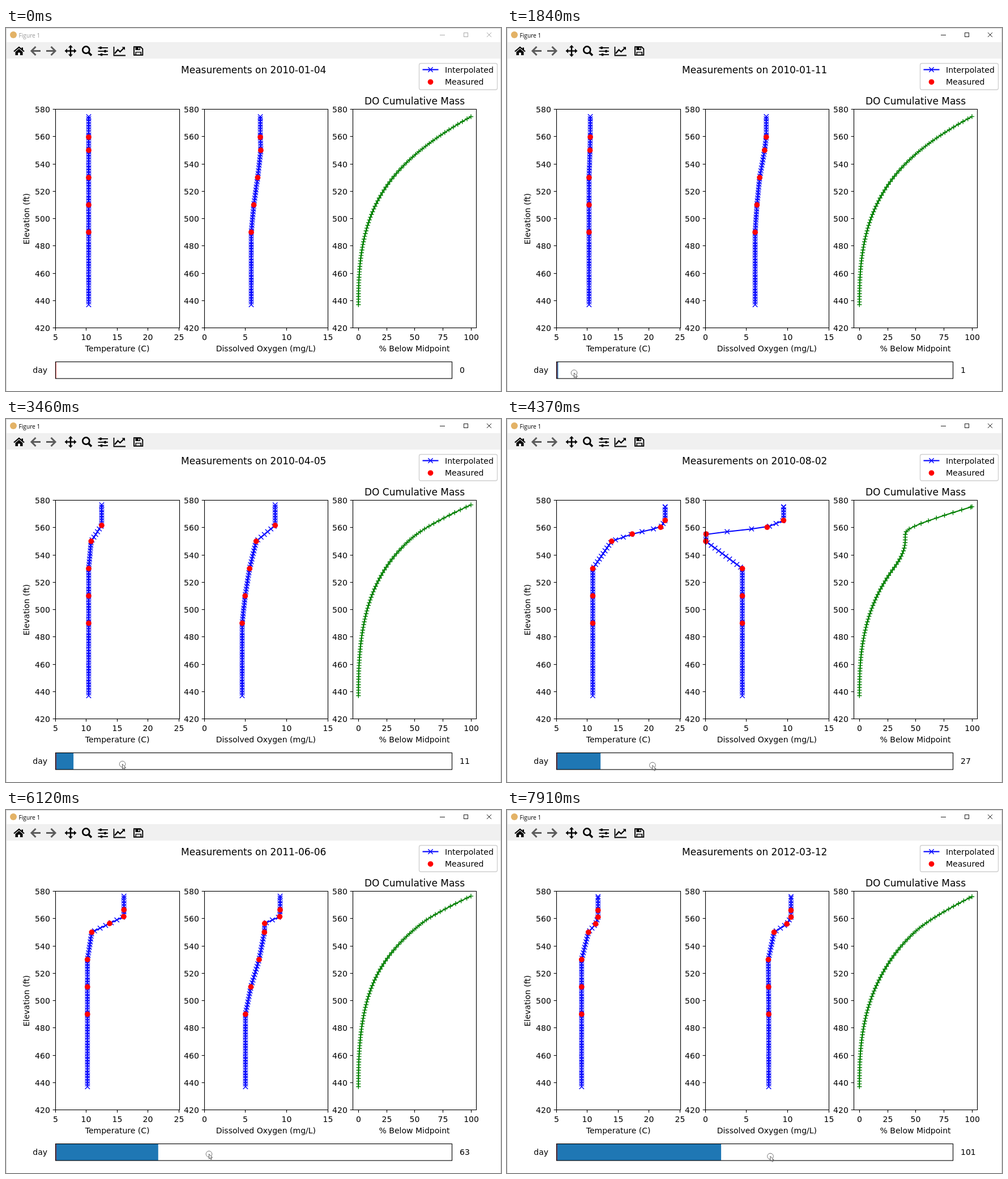
Animation, 874 px wide and 641 px high, one loop 8 s. Source, as an HTML page with a canvas:

```html
<!DOCTYPE html>
<html lang="en">
<head>
<meta charset="utf-8">
<title>Figure 1</title>
<style>
html, body { margin: 0; width: 874px; height: 641px; overflow: hidden; background: #fff; }
canvas { display: block; }
</style>
</head>
<body>
<canvas id="stage" width="874" height="641"></canvas>
<script>
const ctx = document.getElementById('stage').getContext('2d');
const LOOP = 8000, CLICK = 1240, REDRAW = 450;
const SANS = '"DejaVu Sans", sans-serif';
const SMALL = `14px ${SANS}`, LARGE = `17px ${SANS}`;
const TOP = 143.5, BOTTOM = 529.5, AXW = 218.5;
const BASE = 437, INK = '#000';

// step: redraw count, age: days since the first date
// temp: deep, at 550 ft, surface; oxy: at 490, 530, 550 ft, surface; ramp: start and end of the oxygen rise
const winter = { step: 0, day: 0, age: 0, temp: [10.4, 10.4, 10.4], oxy: [5.7, 6.48, 6.86, 6.8], ramp: [550, 559] };
const seasons = [
  winter,
  { step: 4, day: 1, age: 7, temp: [10.3, 10.45, 10.5], oxy: [6.05, 6.6, 7.2, 7.4], ramp: [550, 559] },
  { step: 7, day: 11, age: 91, temp: [10.4, 10.8, 12.5], oxy: [4.6, 5.5, 6.3, 8.6], ramp: [550, 561] },
  { step: 9, day: 27, age: 210, temp: [10.9, 13.95, 22.6], oxy: [4.5, 4.5, .07, 9.5], ramp: [555, 562.5] },
  { ...winter, step: 11, day: 45, age: 364 },
  { step: 13, day: 63, age: 518, temp: [10.2, 10.9, 16.1], oxy: [5, 6.65, 7.3, 9.2], ramp: [556, 562] },
  { step: 16, day: 80, age: 640, temp: [10.5, 14.95, 19.4], oxy: [4.65, 4.6, .14, 5.5], ramp: [550, 555] },
  { step: 17, day: 101, age: 798, temp: [9.1, 10.2, 11.75], oxy: [7.7, 7.65, 8.35, 10.4], ramp: [550, 559] }
];

const clamp = v => Math.max(0, Math.min(1, v));
const mix = (a, b, k) => a + (b - a) * k;
const smooth = (a, b, v) => {
  const k = clamp((v - a) / (b - a));
  return k * k * (3 - 2 * k);
};

function interp(xs, ys, x) {
  if (x <= xs[0]) return ys[0];
  for (let i = 1; i < xs.length; i++) {
    if (x <= xs[i]) return mix(ys[i - 1], ys[i], (x - xs[i - 1]) / (xs[i] - xs[i - 1]));
  }
  return ys[ys.length - 1];
}

function seasonAt(step) {
  const next = Math.max(1, seasons.findIndex(s => s.step >= step));
  const a = seasons[next - 1], b = seasons[next];
  const k = clamp((step - a.step) / (b.step - a.step));
  const blend = name => a[name].map((v, i) => mix(v, b[name][i], k));
  return {
    day: Math.floor(mix(a.day, b.day, k)), age: Math.round(mix(a.age, b.age, k)),
    temp: blend('temp'), oxy: blend('oxy'), ramp: blend('ramp')
  };
}

// The lake level swings with the time of year
function surfaceLevel(age) {
  const turn = 2 * Math.PI * age / 365;
  return 575.5 + Math.sin(turn - .63) + .4 * Math.cos(2 * turn - 3.77);
}

function profileOf({ day, age, temp, oxy, ramp }) {
  const surf = surfaceLevel(age);
  const upper = day > 15 ? [surf - 20, surf - 15, surf - 10] : [surf - 15];
  return {
    surf,
    elev: [490, 510, 530, 550, ...upper],
    temp: [temp[0], temp[0], temp[0], temp[1],
      ...upper.map(e => mix(temp[1], temp[2], smooth(550, ramp[1], e)))],
    oxy: [oxy[0], mix(oxy[0], oxy[1], .4), oxy[1], oxy[2],
      ...upper.map(e => mix(oxy[2], oxy[3], smooth(...ramp, e)))]
  };
}

function depthGrid(surf) {
  const out = [];
  for (let e = BASE; e < surf; e += 2) out.push(e);
  return [...out, surf];
}

// Percentage of oxygen mass lying below each grid level
function cumulative(grid, p) {
  const volume = e => {
    const h = (e - BASE) / (p.surf - BASE);
    return .6 * h ** 2.4 + .4 * h ** 3.6;
  };
  let sum = 0;
  const mass = grid.map((e, i) => {
    if (i) sum += interp(p.elev, p.oxy, (e + grid[i - 1]) / 2) * (volume(e) - volume(grid[i - 1]));
    return sum;
  });
  return mass.map(m => 100 * m / sum);
}

function text(str, x, y, font = SMALL, align = 'center', color = INK) {
  ctx.font = font;
  ctx.textAlign = align;
  ctx.fillStyle = color;
  ctx.fillText(str, x, y);
}

function stroke(color, width) {
  ctx.strokeStyle = color;
  ctx.lineWidth = width;
  ctx.stroke();
}

function line(points, color = INK, width = 1.11) {
  ctx.beginPath();
  points.forEach(([x, y]) => ctx.lineTo(x, y));
  stroke(color, width);
}

function rect(x, y, w, h, color) {
  ctx.fillStyle = color;
  ctx.fillRect(x, y, w, h);
}

function frame(x, y, w, h, color = INK, width = 1.11) {
  ctx.strokeStyle = color;
  ctx.lineWidth = width;
  ctx.strokeRect(x, y, w, h);
}

function ring(x, y, r, color, width) {
  ctx.beginPath();
  ctx.arc(x, y, r, 0, 7);
  stroke(color, width);
}

function dot(x, y, r, color) {
  ctx.beginPath();
  ctx.arc(x, y, r, 0, 7);
  ctx.fillStyle = color;
  ctx.fill();
}

function marks(points, kind, color) {
  const r = 4.17;
  ctx.beginPath();
  for (const [x, y] of points) {
    if (kind === 'x') {
      ctx.moveTo(x - r, y - r); ctx.lineTo(x + r, y + r);
      ctx.moveTo(x - r, y + r); ctx.lineTo(x + r, y - r);
    } else {
      ctx.moveTo(x - r, y); ctx.lineTo(x + r, y);
      ctx.moveTo(x, y - r); ctx.lineTo(x, y + r);
    }
  }
  stroke(color, 1.39);
}

const snap = v => Math.floor(v + .5) + .5;
const yOf = e => mix(BOTTOM, TOP, (e - 420) / 160);
const tempX = v => 87 + (v - 5) * AXW / 20;
const oxyX = v => 350 + v * AXW / 15;
const massX = v => 622.3 + v * 1.9865;

function plot(values, elevs, toX, kind, color) {
  const pts = values.map((v, i) => [toX(v), yOf(elevs[i])]);
  line(pts, color, 2.08);
  marks(pts, kind, color);
}

function axes(index, toX, start, step, end, label) {
  const x0 = 87.4 + index * AXW * 1.2;
  const left = snap(x0), right = snap(x0 + AXW);
  frame(left, TOP, right - left, BOTTOM - TOP);
  for (let v = start; v <= end; v += step) {
    const x = snap(toX(v) - .4);
    line([[x, BOTTOM], [x, BOTTOM + 4.9]]);
    text(v, x, 551);
  }
  for (let e = 420; e <= 580; e += 20) {
    const y = snap(yOf(e) - .5);
    line([[left - 4.9, y], [left, y]]);
    text(e, left - 9.7, y + 5.3, SMALL, 'right');
  }
  text(label, x0 + AXW / 2, 571);
}

function shape(d, color, width) {
  const p = new Path2D(d);
  if (width) {
    ctx.strokeStyle = color;
    ctx.lineWidth = width;
    ctx.stroke(p);
  } else {
    ctx.fillStyle = color;
    ctx.fill(p);
  }
}

function arrowIcon(x, dir) {
  line([[x + 9 * dir, 40.5], [x - 6 * dir, 40.5]], '#5c5c5c', 3);
  line([[x + .5 * dir, 33], [x - 7 * dir, 40.5], [x + .5 * dir, 48]], '#5c5c5c', 3);
}

function panIcon() {
  ctx.save();
  ctx.translate(114, 40.5);
  for (let i = 0; i < 4; i++) {
    ctx.rotate(Math.PI / 2);
    line([[0, 0], [0, -7.5]], INK, 2.4);
    shape('M0 -10.5L4 -6H-4Z', INK);
  }
  ctx.restore();
}

function toolbar() {
  const gray = '#f0f0f0';
  rect(0, 25, 874, 29, gray);
  // home
  shape('M14 41.5L23 34L32 41.5', INK, 2.2);
  shape('M23 36.8L29.5 42.2V48H25V43.5H21V48H16.5V42.2ZM27.5 34.5H30V39L27.5 37Z', INK);
  arrowIcon(52, 1);
  arrowIcon(80, -1);
  panIcon();
  // zoom
  ring(141.3, 38.7, 6, INK, 2.7);
  line([[145.5, 43], [151, 48.5]], INK, 3.6);
  // sliders
  [167, 175, 168.5].forEach((x, i) => {
    const y = 35 + 6 * i;
    line([[162.5, y], [180, y]], INK, 1.8);
    rect(x - 1.6, y - 2.2, 3.4, 4.4, INK);
  });
  // chart
  shape('M190.5 33V48.5H211', INK, 1.8);
  shape('M192 45L197.5 38.5L201.5 42L208 35.5', INK, 2.3);
  shape('M204.5 33.5H210V39Z', INK);
  // save
  shape('M226 33.2H237.5L241.3 37V47.8H226Z', INK, 1.9);
  shape('M228.5 33H237V39H228.5ZM228.5 42H239V48H228.5Z', INK);
  rect(233.6, 34.6, 2, 3, gray);
  rect(230, 43.3, 7.5, 3.5, gray);
}

function titleBar(active) {
  dot(13, 12, 6, '#e3b266');
  text('Figure 1', 22.5, 16.5, '10.2px "Open Sans", "Noto Sans", sans-serif', 'left', active ? INK : '#999');
  const ink = active ? '#222' : '#aaa';
  line([[766, 12.5], [775, 12.5]], ink, 1);
  frame(808.5, 8.5, 7, 7, ink, 1);
  line([[849, 8], [857, 16]], ink, 1);
  line([[849, 16], [857, 8]], ink, 1);
}

function legend() {
  ctx.beginPath();
  ctx.roundRect(729.5, 62.5, 138, 46.5, 3);
  stroke('#d0d0d0', 1.39);
  line([[735.5, 73.5], [763.5, 73.5]], '#00f', 2.08);
  marks([[749.5, 73.5]], 'x', '#00f');
  dot(749.5, 95.3, 4.86, '#f00');
  text('Interpolated', 775, 78.5, SMALL, 'left');
  text('Measured', 775, 100, SMALL, 'left');
}

function slider(day) {
  const x = 87.5, y = 589.5, h = 29.5;
  rect(x, y, day * 2.877, h, '#1f77b4');
  line([[88, y], [88, y + h]], '#f00', 1);
  frame(x, y, 700, h);
  text('day', 73, 608.5, SMALL, 'right');
  text(day, 801, 608.5, SMALL, 'left');
}

function pointerAt(t) {
  const enter = clamp((t - 150) / 540);
  const drag = clamp((t - CLICK) / (7910 - CLICK));
  const drift = 609.5 + 2 * Math.cos(2 * Math.PI * (t - 4370) / 3540);
  return [
    mix(97, 90, enter) + 375 * drag ** 1.07,
    mix(mix(634, 602, enter), drift, clamp((t - CLICK) / 500))
  ];
}

function cursor(t) {
  if (t < 150) return;
  const [x, y] = pointerAt(t);
  if (t >= CLICK) ring(x, y, 5.3, '#666', .9);
  ctx.save();
  ctx.translate(x, y);
  const arrow = 'M0 0V8.5L2 6.7L3.3 9.7L4.7 9L3.4 6.2H6Z';
  shape(arrow, '#fff');
  shape(arrow, '#333', .8);
  ctx.restore();
}

function draw(t) {
  const season = seasonAt(Math.floor(t / REDRAW));
  const p = profileOf(season);
  const grid = depthGrid(p.surf);
  const date = new Date(Date.UTC(2010, 0, 4 + season.age)).toISOString().slice(0, 10);

  rect(0, 0, 874, 641, '#fff');
  titleBar(t >= CLICK);
  toolbar();
  frame(.5, .5, 873, 641, '#d2d2d2', 1);

  [[p.temp, tempX], [p.oxy, oxyX]].forEach(([vals, toX]) => {
    plot(grid.map(e => interp(p.elev, vals, e)), grid, toX, 'x', '#00f');
    p.elev.forEach((e, i) => dot(toX(vals[i]), yOf(e), 4.86, '#f00'));
  });
  plot(cumulative(grid, p), grid, massX, '+', '#008000');

  axes(0, tempX, 5, 5, 25, 'Temperature (C)');
  axes(1, oxyX, 0, 5, 15, 'Dissolved Oxygen (mg/L)');
  axes(2, massX, 0, 25, 100, '% Below Midpoint');
  ctx.save();
  ctx.translate(41, 337);
  ctx.rotate(-Math.PI / 2);
  text('Elevation (ft)', 0, 0);
  ctx.restore();

  text('Measurements on ' + date, 437.2, 79.5, LARGE);
  text('DO Cumulative Mass', 721.5, 135, LARGE);
  legend();
  slider(season.day);
  cursor(t);
}

let begin;
function tick(now) {
  begin ??= now;
  draw((now - begin) % LOOP);
  requestAnimationFrame(tick);
}
draw(0);
requestAnimationFrame(tick);
</script>
</body>
</html>
```
